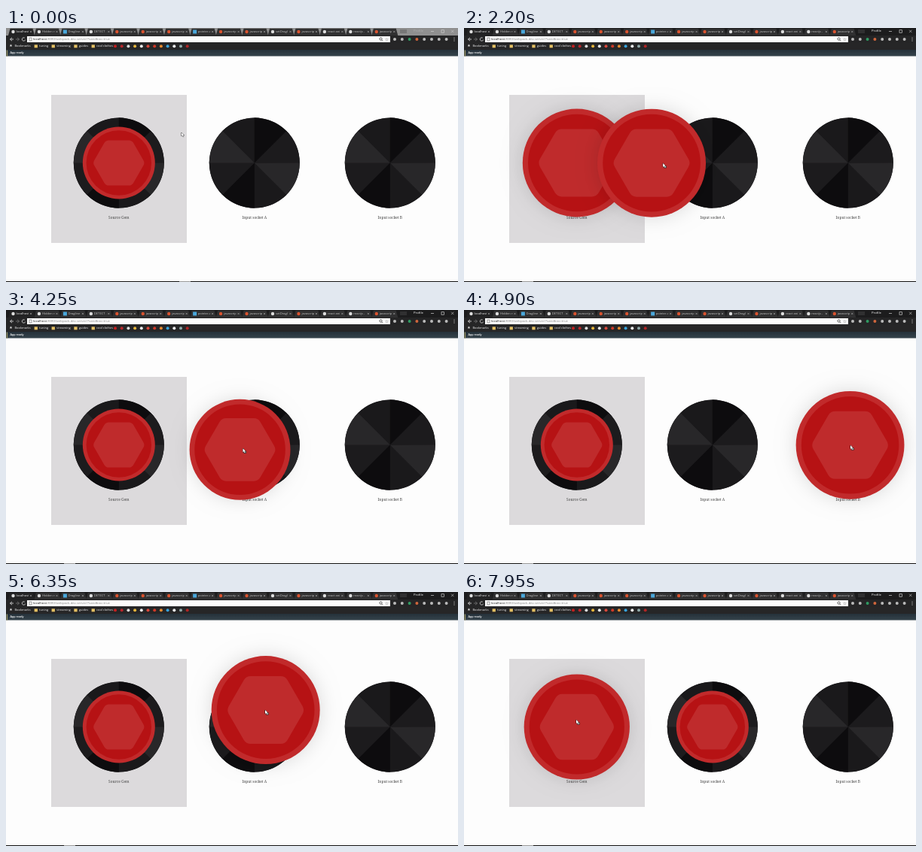
Animation of 600x338 px, one loop 8 s. Source, as an HTML page with a canvas:

```html
<!DOCTYPE html>
<html lang="en">
<head>
<meta charset="utf-8">
<title>Gem sockets</title>
<style>
html, body { margin: 0; width: 100%; height: 100%; overflow: hidden; background: #fdfdfd; }
canvas { display: block; width: 600px; height: 338px; }
</style>
</head>
<body>
<canvas id="stage" width="600" height="338"></canvas>
<script>
const ctx = document.getElementById('stage').getContext('2d');
const LOOP = 8000;
const SMALL = 48, BIG = 72;
const SANS = '"Open Sans", "Noto Sans", sans-serif';
const SERIF = '"Noto Serif", serif';
const SYMBOLS = '"DejaVu Sans", sans-serif';
const ICON_COLORS = ['#c42020', '#b7272c', '#dddddd', '#e7b63c', '#eeeeee', '#d9483b',
  '#cf3927', '#e68a2e', '#38a4dc', '#eeeeee', '#8fa8a8', '#b02525'];

const [SOURCE, SOCKET_A, SOCKET_B] = [0, 1, 2].map(i => ({ x: 149.8 + i * 180, y: 179.5 }));

// Moments of the story, in ms
const HOVER = 1000, DRAG = 1750, DROP = 2850, GRAB = 4118, RELEASE = 7000, PRESS = 7778;

const START = { x: 233, y: 139 };
const MOVES = [
  { from: 150, until: 850, to: { x: 149, y: 178 } },
  { from: 1780, until: 2500, to: { x: 333, y: 181 } },
  { from: 3100, until: 3600, to: { x: 505, y: 187 } },
  { from: 3720, until: 4090, to: { x: 310, y: 186 } },
  { from: 4190, until: 4880, to: { x: 513, y: 180 }, arch: 25 },
  { from: 5300, until: 6350, to: { x: 344, y: 157 } },
  { from: 6350, until: 6850, to: { x: 331, y: 179 } },
  { from: 7050, until: 7600, to: { x: 149, y: 170 } }
];

function ramp(t, from, until) {
  const u = Math.max(0, Math.min(1, (t - from) / (until - from)));
  return u * u * (3 - 2 * u);
}

function mix(a, b, u) {
  return { x: a.x + (b.x - a.x) * u, y: a.y + (b.y - a.y) * u };
}

function spring(t) {
  return t <= 0 ? 0 : 1 - Math.exp(-t / 140) * Math.cos(t * 0.0075);
}

function radius(lift) {
  return SMALL + (BIG - SMALL) * lift;
}

function pointerAt(t) {
  return MOVES.reduce((p, { from, until, to, arch = 0 }) => {
    const u = ramp(t, from, until);
    const next = mix(p, to, u);
    next.y -= arch * Math.sin(Math.PI * u);
    return next;
  }, START);
}

function rect(x, y, w, h, color) {
  ctx.fillStyle = color;
  ctx.fillRect(x, y, w, h);
}

function disc(x, y, r, color) {
  ctx.fillStyle = color;
  ctx.beginPath();
  ctx.arc(x, y, r, 0, Math.PI * 2);
  ctx.fill();
}

function text(str, x, y, size, color, family = SANS, align = 'left', weight = 400) {
  ctx.font = `${weight} ${size}px ${family}`;
  ctx.textAlign = align;
  ctx.textBaseline = 'middle';
  ctx.fillStyle = color;
  ctx.fillText(str, x, y);
  return ctx.measureText(str).width;
}

function line(points, color, width = 0.8) {
  ctx.strokeStyle = color;
  ctx.lineWidth = width;
  ctx.beginPath();
  points.forEach(([x, y]) => ctx.lineTo(x, y));
  ctx.stroke();
}

function cross(x, y, size, color) {
  line([[x - size, y - size], [x + size, y + size]], color, 0.6);
  line([[x + size, y - size], [x - size, y + size]], color, 0.6);
}

function box(x, y, w, h, color) {
  ctx.strokeStyle = color;
  ctx.lineWidth = 0.7;
  ctx.strokeRect(x, y, w, h);
}

function drawTab(name, i) {
  const x = 3 + i * 34.45;
  ctx.fillStyle = i ? '#303031' : '#232324';
  ctx.beginPath();
  ctx.moveTo(x, 10);
  ctx.lineTo(x + 2.5, 0.8);
  ctx.lineTo(x + 32.5, 0.8);
  ctx.lineTo(x + 35, 10);
  ctx.fill();
  if (/^(Drag|pointer)/.test(name)) rect(x + 4, 2.5, 5, 5, '#4aa8dc');
  else disc(x + 6.5, 5, 2.2, name === 'javascrip' ? '#d9532f' : '#dddddd');
  ctx.save();
  ctx.beginPath();
  ctx.rect(x + 10, 0, 17, 10);
  ctx.clip();
  text(name, x + 10.5, 4.8, 4.1, i ? '#c5c5c5' : '#eeeeee');
  ctx.restore();
  cross(x + 30, 4.9, 1.1, '#aaa');
}

function drawTabs(active) {
  const names = Array(15).fill('javascrip');
  names.splice(0, 4, 'localhost', 'Hidden n', 'Dragline', 'DETECT -');
  names[7] = 'pointer-e';
  names[10] = 'setDragI';
  names[12] = 'react ani';
  names[13] = 'reactjs -';
  rect(0, 0, 600, 10, active ? '#1c1c1d' : '#909090');
  names.forEach(drawTab);
  rect(523, 2, 9, 5, active ? '#303031' : '#777');
  text('Profile', 541, 4, 4.3, active ? '#ffffff' : '#b0b0b0');
  line([[564, 4.5], [568, 4.5]], '#ccc', 0.7);
  box(578, 2.7, 3.5, 3.5, '#ccc');
  cross(592.7, 4.4, 1.7, '#ccc');
}

function drawAddressBar() {
  rect(0, 10, 600, 10, '#252526');
  line([[8, 12.8], [5.5, 15], [8, 17.2]], '#e4e4e4');
  line([[5.5, 15], [10, 15]], '#e4e4e4');
  line([[15, 12.8], [17.5, 15], [15, 17.2]], '#777');
  line([[13, 15], [17.5, 15]], '#777');
  ctx.strokeStyle = '#ddd';
  ctx.beginPath();
  ctx.arc(23.5, 15, 2.2, 0.3, 5.4);
  ctx.stroke();
  rect(28, 11, 482, 8, '#fcfcfc');
  box(31, 13, 3, 4, '#777');
  const hostWidth = text('localhost', 36, 14.9, 4.3, '#222');
  text(':8080/webpack-dev-server/?sandbox=true', 36 + hostWidth, 14.9, 4.3, '#888');
  ctx.strokeStyle = '#333';
  ctx.lineWidth = 0.8;
  ctx.beginPath();
  ctx.arc(497.5, 14.5, 1.6, 0, 7);
  ctx.stroke();
  line([[498.6, 15.8], [500.2, 17.4]], '#333');
  text('☆', 505.5, 15, 6, '#444', SYMBOLS, 'center');
  for (let i = 0; i < 8; i++) disc(516 + i * 9.8, 15, 2, i === 2 ? '#2f9b62' : i === 3 ? '#d0663c' : '#bbbbbb');
  for (let i = 0; i < 3; i++) disc(595, 13 + i * 2, 0.6, '#ddd');
}

function drawBookmarks() {
  rect(0, 19.5, 600, 9.5, '#262627');
  text('★', 6.5, 24.2, 5, '#e5e5e5', SYMBOLS, 'center');
  let x = 11.5 + text('Bookmarks', 11.5, 24.2, 4, '#f2f2f2') + 5;
  ['tuning', 'streaming', 'guides', 'cool clothes'].forEach(name => {
    rect(x, 22.3, 4.3, 4, '#e4c063');
    x += 11 + text(name, x + 6.5, 24.2, 4, '#f2f2f2');
  });
  ICON_COLORS.forEach((color, i) => disc(145 + i * 8.7, 24.2, 2, color));
}

function drawAppBar() {
  const shade = ctx.createLinearGradient(0, 29, 0, 37.5);
  shade.addColorStop(0, '#25313a');
  shade.addColorStop(1, '#35434b');
  rect(0, 29, 600, 8.5, shade);
  rect(0.8, 29.5, 1.2, 8, '#a39a64');
  text('App ready', 5.5, 33.2, 3.7, '#ffffff', SANS, 'left', 600);
}

function drawSocket({ x, y }, label) {
  disc(x, y, 60, '#151416');
  // Each wedge runs under the next one, so no seam shows
  for (let i = 0; i < 8; i++) {
    const shade = [40, 26, 13, 28][i % 4];
    const overlap = i < 7 ? 0.1 : 0;
    ctx.fillStyle = `rgb(${shade},${shade - 1},${shade + 1})`;
    ctx.beginPath();
    ctx.moveTo(x, y);
    ctx.arc(x, y, 60, i * Math.PI / 4 - (i ? 0 : 0.01), (i + 1) * Math.PI / 4 + overlap);
    ctx.fill();
  }
  text(label, x, 252.2, 4.8, '#444', SERIF, 'center');
}

function drawGem({ x, y }, r) {
  const lift = Math.max(0, Math.min(1, (r - SMALL) / (BIG - SMALL)));
  ctx.save();
  if (lift > 0) {
    ctx.shadowColor = `rgba(0,0,0,${0.14 * Math.sqrt(lift)})`;
    ctx.shadowBlur = 12 + 14 * lift;
  }
  disc(x, y, r, '#c12a2b');
  ctx.restore();
  disc(x, y, r * 0.9, '#b61214');

  const R = r * 0.722;
  const corner = i => [x + R * Math.cos(i * Math.PI / 3), y + R * Math.sin(i * Math.PI / 3)];
  ctx.fillStyle = '#bf2b2c';
  ctx.beginPath();
  ctx.moveTo(x + R * 0.75, y + R * Math.sqrt(3) / 4);
  for (let i = 1; i <= 6; i++) ctx.arcTo(...corner(i), ...corner(i + 1), r * 0.15);
  ctx.closePath();
  ctx.fill();
}

function drawPointer({ x, y }, dragging) {
  ctx.save();
  ctx.translate(x, y);
  if (dragging) {
    rect(1.3, 3.8, 3, 2.3, '#ddd');
    box(1.3, 3.8, 3, 2.3, '#222');
  }
  const arrow = new Path2D('M0 0V5L1.1 4L2 5.9L2.8 5.5L2 3.7L3.5 3.6Z');
  ctx.fillStyle = '#fff';
  ctx.strokeStyle = '#111';
  ctx.lineWidth = 0.8;
  ctx.stroke(arrow);
  ctx.fill(arrow);
  ctx.restore();
}

function drawGems(t) {
  const sourceLift = spring(t - HOVER) - spring(t - DROP) + spring(t - PRESS);
  drawGem(SOURCE, radius(sourceLift));
  if (t < DRAG) return;

  const movedLift = 1 - spring(t - DROP - 68) + spring(t - GRAB) - spring(t - RELEASE);
  const pull = ramp(t, DRAG, DRAG + 100) - ramp(t, DROP, DROP + 150)
    + ramp(t, GRAB, GRAB + 120) - ramp(t, RELEASE, RELEASE + 150);
  const home = t < DROP ? SOURCE : SOCKET_A;
  drawGem(mix(home, pointerAt(t - 40), pull), radius(movedLift));
}

function draw(t) {
  const active = t >= 50;
  rect(0, 0, 600, 338, '#fdfdfd');
  drawTabs(active);
  drawAddressBar();
  drawBookmarks();
  drawAppBar();
  rect(0, 337, 600, 1, '#111');
  rect(active ? 77 : 230, 337, 15, 1, '#999');

  rect(60, 89, 180, 197, '#dcdadc');
  drawSocket(SOURCE, 'Source Gem');
  drawSocket(SOCKET_A, 'Input socket A');
  drawSocket(SOCKET_B, 'Input socket B');
  drawGems(t);

  const dragging = (t >= DRAG && t < DROP) || (t >= GRAB && t < RELEASE) || t >= PRESS;
  drawPointer(pointerAt(t), dragging);
}

const began = performance.now();
function tick() {
  draw((performance.now() - began) % LOOP);
  requestAnimationFrame(tick);
}
tick();
</script>
</body>
</html>
```
